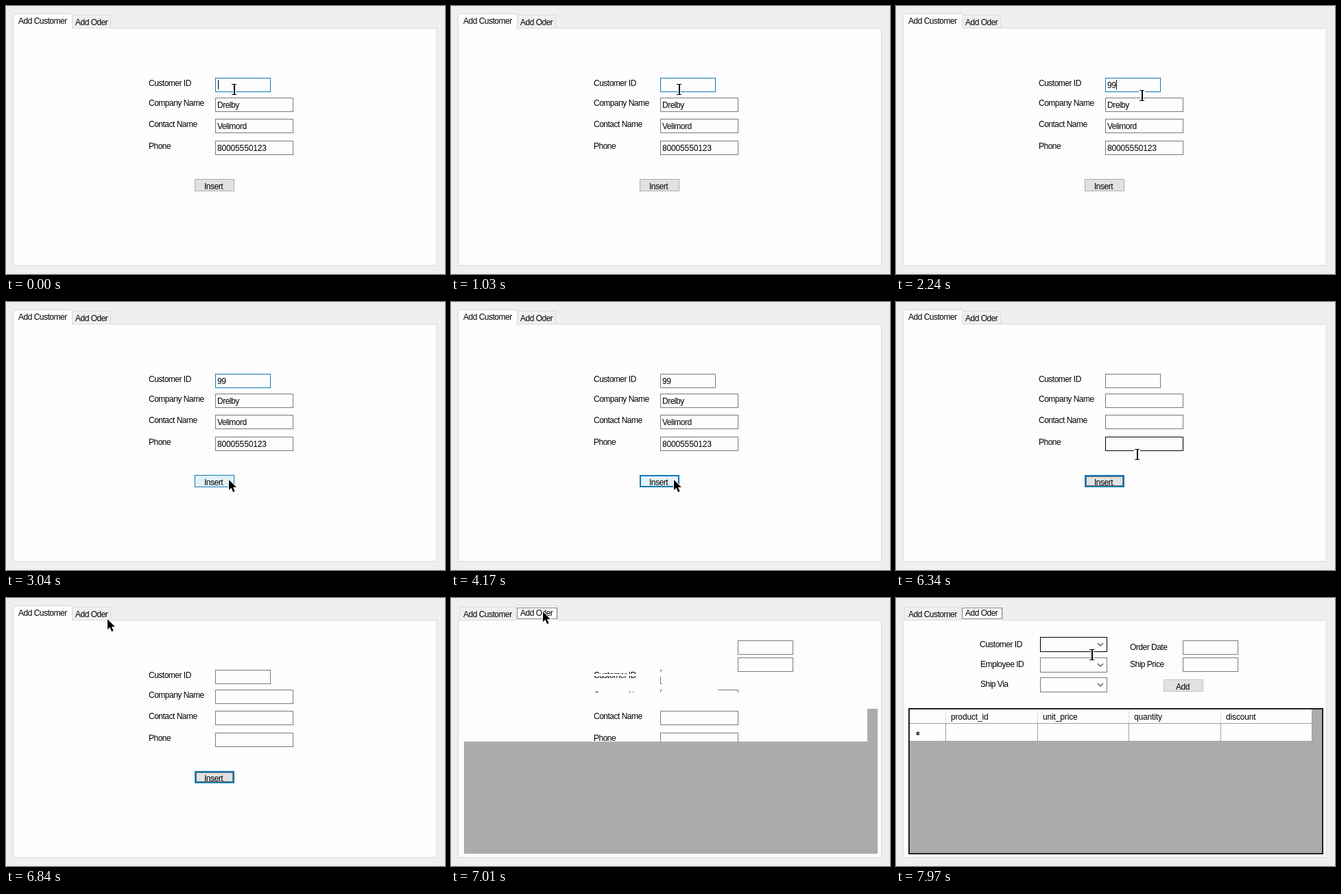
Write an HTML page with a canvas that moves like this. It is 640x392 px and loops after 8 s.

```html
<!DOCTYPE html>
<html lang="en">
<head>
<meta charset="utf-8">
<title>Customer form</title>
<style>
  html, body { margin: 0; width: 100%; height: 100%; overflow: hidden; background: #efeff0; }
  canvas { display: block; }
</style>
</head>
<body>
<canvas id="stage" width="640" height="392"></canvas>
<script>
const ctx = document.getElementById('stage').getContext('2d');
const LOOP = 8000;
const TYPED = [1300, 1500];
const PRESS = 3400, RELEASE = 3600, CLEARED = 5100, SWITCH = 6940, PAINTED = 7040;
const BG = '#efeff0', PAGE = '#fdfdfd', LINE = '#dcdcdf', EDGE = '#7a7a7c', BLUE = '#0f79b4';
const BUTTON = '#e1e1e1', GRID = '#ababab', RULE = '#a0a0a0';
const TIGHT = -.5, LOOSE = -.15;

// Pointer hot spot: time, x, y
const PATH = [
  [0, 332, 116], [1700, 332, 116], [2240, 358, 125], [2540, 358, 125],
  [2780, 340, 190], [3000, 325, 261], [4170, 325, 261], [4500, 464, 364],
  [4770, 449, 352], [6110, 449, 352], [6340, 351, 217], [6640, 220, 90],
  [6880, 134, 21], [7210, 134, 21], [7600, 215, 50], [7900, 285, 77], [LOOP, 285, 77]
];

const FIELDS = [
  { label: 'Customer ID', y: 105, w: 81, labelY: 112 },
  { label: 'Company Name', y: 134, w: 114, labelY: 141, value: 'Drelby' },
  { label: 'Contact Name', y: 165, w: 114, labelY: 172, value: 'Velimord' },
  { label: 'Phone', y: 197, w: 114, labelY: 204, value: '80005550123' }
];
const COMBOS = [['Customer ID', 57, 67, 122], ['Employee ID', 87, 96, 123], ['Ship Via', 116, 125, 123]];
const BOXES = [['Order Date', 62, 71], ['Ship Price', 87, 96]];
const COLUMNS = [['product_id', 72], ['unit_price', 206], ['quantity', 339], ['discount', 473]];

function fill(x, y, w, h, color) {
  ctx.fillStyle = color;
  ctx.fillRect(x, y, w, h);
}

function box(x, y, w, h, back, edge, thick = 1) {
  fill(x, y, w, h, edge);
  fill(x + thick, y + thick, w - 2 * thick, h - 2 * thick, back);
}

function text(string, x, midY, spacing = TIGHT) {
  ctx.font = '12px "Liberation Sans", Arial, sans-serif';
  ctx.letterSpacing = `${spacing}px`;
  ctx.fillStyle = '#000';
  ctx.fillText(string, x, midY + 5);
}

function dotted(x, y, w, h) {
  ctx.strokeStyle = '#000';
  ctx.lineWidth = 1;
  ctx.setLineDash([1, 1]);
  ctx.strokeRect(x + .5, y + .5, w - 1, h - 1);
  ctx.setLineDash([]);
}

const inside = (p, x, y, w, h) => p.x >= x && p.x <= x + w && p.y >= y && p.y <= y + h;

function pointerAt(t) {
  const i = PATH.findIndex(k => k[0] > t);
  const [t0, x0, y0] = PATH[i - 1], [t1, x1, y1] = PATH[i];
  const k = (t - t0) / (t1 - t0);
  return { x: Math.round(x0 + (x1 - x0) * k), y: Math.round(y0 + (y1 - y0) * k) };
}

function drawFrame(orders) {
  fill(0, 0, 640, 392, BG);
  box(10, 32, 618, 348, PAGE, LINE);
  if (orders) {
    box(12, 13, 83, 20, BG, LINE);
    box(94, 11, 62, 22, PAGE, LINE);
    fill(95, 31, 60, 3, PAGE);
    dotted(96, 14, 59, 17);
  } else {
    box(96, 13, 57, 20, BG, LINE);
    box(10, 11, 87, 22, PAGE, LINE);
    fill(11, 31, 85, 3, PAGE);
  }
  text('Add Customer', 18, orders ? 23 : 21);
  text('Add Oder', 101, orders ? 21 : 23);
}

function drawCustomer(t, pointer) {
  const id = '9'.repeat(TYPED.filter(time => t >= time).length);
  const idFocused = t < PRESS;
  FIELDS.forEach((field, i) => {
    const hover = inside(pointer, 305, field.y, field.w, 21);
    const edge = i === 0 && idFocused ? BLUE : hover ? '#000' : EDGE;
    text(field.label, 208, field.labelY);
    box(305, field.y, field.w, 21, PAGE, edge);
    if (t < CLEARED) text(i ? field.value : id, 308, field.y + 10, i === 3 ? LOOSE : TIGHT);
  });
  if (idFocused && t % 1060 < 530) fill(309 + Math.floor(id.length * 6.2), 108, 1, 14, '#000');

  const hover = inside(pointer, 275, 253, 58, 18);
  const pressed = t >= PRESS && t < RELEASE;
  const back = pressed ? '#cce4f7' : hover ? '#e3f1f8' : BUTTON;
  const edge = hover || !idFocused ? BLUE : '#adadad';
  box(275, 253, 58, 18, back, edge, idFocused ? 1 : 2);
  if (t >= CLEARED) dotted(277, 255, 54, 14);
  text('Insert', 289, 263);
}

// Half-repainted page while the tabs change over
function drawTransition() {
  FIELDS.forEach(field => {
    text(field.label, 208, field.labelY);
    box(305, field.y, field.w, 21, PAGE, EDGE);
  });
  fill(200, 104, 104, 4, PAGE);
  fill(200, 111, 104, 3, PAGE);
  fill(308, 104, 80, 23, PAGE);
  fill(304, 108, 5, 7, PAGE);
  fill(308, 133, 81, 5, PAGE);
  fill(200, 138, 222, 20, PAGE);
  BOXES.forEach(([, y]) => box(418, y, 81, 21, PAGE, EDGE));
  fill(607, 162, 15, 48, GRID);
  fill(19, 210, 603, 164, GRID);
}

function drawOrders(pointer) {
  COMBOS.forEach(([label, y, labelY, x]) => {
    text(label, x, labelY);
    box(210, y, 98, 22, PAGE, inside(pointer, 210, y, 98, 22) ? '#000' : EDGE);
    ctx.strokeStyle = '#444';
    ctx.lineWidth = 1.2;
    ctx.beginPath();
    ctx.moveTo(294, y + 9);
    ctx.lineTo(298, y + 13);
    ctx.lineTo(302, y + 9);
    ctx.stroke();
  });
  BOXES.forEach(([label, y, labelY]) => {
    text(label, 341, labelY);
    box(418, y, 81, 21, PAGE, EDGE);
  });
  box(390, 119, 58, 18, BUTTON, '#c4c4c4');
  text('Add', 408, 129);

  box(18, 161, 605, 214, GRID, '#202020', 2);
  fill(20, 163, 587, 47, PAGE);
  fill(20, 183, 587, 1, RULE);
  fill(20, 209, 587, 1, RULE);
  COLUMNS.forEach(([name, x]) => {
    fill(x, 163, 1, 20, LINE);
    fill(x, 183, 1, 27, RULE);
    text(name, x + 8, 173, LOOSE);
  });
  fill(606, 163, 1, 47, RULE);
  ctx.strokeStyle = '#222';
  ctx.lineWidth = 1.2;
  ctx.beginPath();
  for (let a = 0; a < 3; a++) {
    const dx = 3 * Math.sin(a * Math.PI / 3), dy = 3 * Math.cos(a * Math.PI / 3);
    ctx.moveTo(32 - dx, 198 - dy);
    ctx.lineTo(32 + dx, 198 + dy);
  }
  ctx.stroke();
}

function drawPointer({ x, y }, beam) {
  ctx.save();
  ctx.translate(x, y);
  if (beam) {
    fill(-4, -3, 9, 4, '#fff');
    fill(-1, -2, 4, 16, '#fff');
    fill(-4, 12, 9, 4, '#fff');
    fill(-3, -2, 7, 1, '#000');
    fill(0, -2, 2, 16, '#000');
    fill(-3, 13, 7, 1, '#000');
  } else {
    const arrow = new Path2D('M0 -1V14L3.5 10.8L6 17L8.6 16L6 10H10.8Z');
    ctx.strokeStyle = '#fff';
    ctx.lineWidth = 2;
    ctx.stroke(arrow);
    ctx.fillStyle = '#000';
    ctx.fill(arrow);
  }
  ctx.restore();
}

function render(now) {
  const t = now % LOOP;
  const pointer = pointerAt(t);
  const orders = t >= SWITCH;
  drawFrame(orders);
  if (!orders) drawCustomer(t, pointer);
  else if (t < PAINTED) drawTransition();
  else drawOrders(pointer);
  const beam = orders
    ? COMBOS.some(([, y]) => inside(pointer, 210, y, 98, 22))
    : FIELDS.some(f => inside(pointer, 305, f.y, f.w, 21));
  drawPointer(pointer, beam);
}

const start = performance.now();
function tick() {
  render(performance.now() - start);
  requestAnimationFrame(tick);
}
tick();
</script>
</body>
</html>
```
